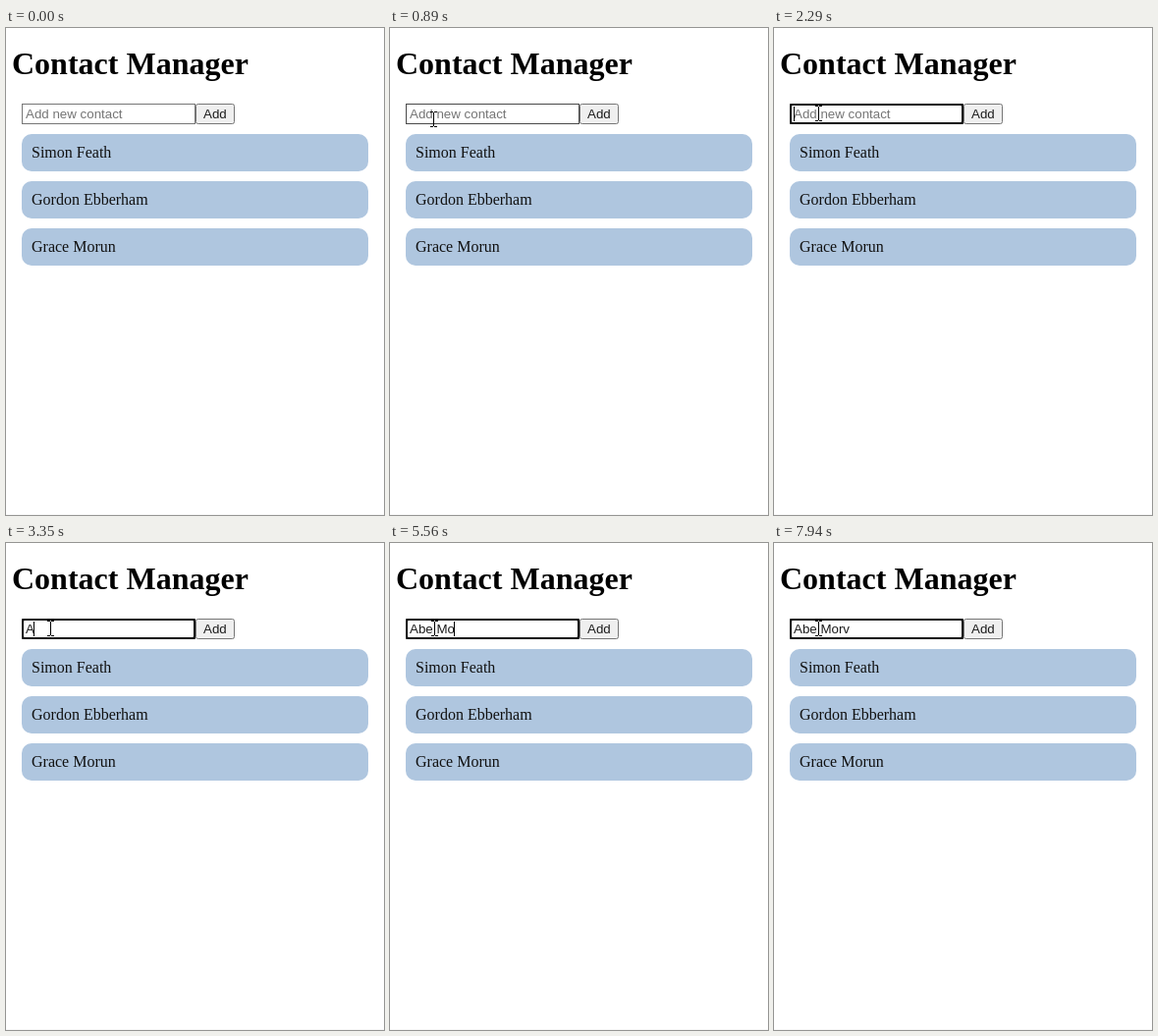
Recreate the animation shown at these times as an HTML page. Size 385 by 496 pixels, loop 8000 ms.

```html
<!DOCTYPE html>
<html lang="en">
<head>
<meta charset="utf-8">
<title>Contact Manager</title>
<style>
html, body { margin: 0; width: 100%; height: 100%; overflow: hidden; background: #fff; }
svg { display: block; width: 385px; height: 496px; }
text { white-space: pre; }
.serif { font: 16px "Liberation Serif", "Times New Roman", serif; fill: #111; }
.title { font-size: 32px; font-weight: bold; fill: #000; }
.sans { font: 13.3333px "Liberation Sans", Arial, sans-serif; fill: #1c1c1c; }
.sans.hint { fill: #757575; }
</style>
</head>
<body>
<svg viewBox="0 0 385 496" xmlns="http://www.w3.org/2000/svg">
  <rect width="385" height="496" fill="#fff"/>
  <rect y="495" width="385" height="1" fill="#f8f8f8"/>
  <text class="serif title" x="6" y="47">Contact Manager</text>
  <rect id="field" x="16.5" y="77.5" width="176" height="20" fill="#fff"/>
  <rect x="193.5" y="77.5" width="39" height="20" rx="2" fill="#efefef" stroke="#767676"/>
  <text class="sans" x="201" y="92">Add</text>
  <rect id="ring" x="17" y="78" width="175" height="19" rx="2" fill="#fff" stroke="#101010" stroke-width="2"/>
  <text id="entry" x="20" y="92"></text>
  <rect id="caret" y="80" width="1" height="15"/>
  <g id="list"></g>
  <path id="arrow" d="M.5 .5V16.5L4.2 13L6.7 18.6L9.2 17.5L6.8 12H11.8Z" fill="#fff" stroke="#000"/>
  <path id="beam" d="M-3 -8H0V-7H1V-8H4V-7H1V7H4V8H1V7H0V8H-3V7H0V-7H-3Z"/>
</svg>
<script>
const LOOP = 8000, ENTER = 150, HOVER = 890, FOCUS = 1230, BLINK = 530, LEFT = 20;
const contacts = ["Simon Feath", "Gordon Ebberham", "Grace Morun"];
const typed = "Abe Morv";
const keys = [3350, 3980, 4080, 4280, 5010, 5560, 6220, 6350];

// Pointer waypoints: time, x, y
const path = [
  [ENTER, 285, 449], [330, 47, 149], [430, 40, 98], [620, 47, 208],
  [780, 47, 208], [HOVER, 44, 93], [1030, 45, 82], [FOCUS, 45, 87]
];

const $ = id => document.getElementById(id);
const set = (el, attrs) => {
  for (const k in attrs) el.setAttribute(k, attrs[k]);
  return el;
};
const show = (el, on) => { el.style.display = on ? "" : "none"; };
const add = (tag, attrs) =>
  $("list").appendChild(set(document.createElementNS("http://www.w3.org/2000/svg", tag), attrs));

contacts.forEach((name, i) => {
  const y = 108 + 48 * i;
  add("rect", { x: 16, y, width: 353, height: 38, rx: 10, fill: "#afc6df" });
  add("text", { class: "serif", x: 26, y: y + 24 }).textContent = name;
});

const pen = document.createElement("canvas").getContext("2d");
pen.font = '13.3333px "Liberation Sans", Arial, sans-serif';

function pointer(t) {
  const i = path.findIndex(p => p[0] > t);
  if (i < 0) return path[path.length - 1].slice(1);
  if (i === 0) return path[0].slice(1);
  const a = path[i - 1], b = path[i], u = (t - a[0]) / (b[0] - a[0]);
  return [1, 2].map(k => Math.round(a[k] + (b[k] - a[k]) * u));
}

function draw(t) {
  const focused = t >= FOCUS, hover = t >= HOVER;
  set($("field"), { stroke: hover ? "#4a4a4a" : "#767676" });
  show($("ring"), focused);

  const pressed = keys.filter(k => t >= k);
  const text = typed.slice(0, pressed.length);
  $("entry").textContent = text || "Add new contact";
  set($("entry"), { class: text ? "sans" : "sans hint" });

  // Each key press restarts the caret's blink
  const since = t - (pressed.pop() || FOCUS);
  show($("caret"), focused && Math.floor(since / BLINK) % 2 === 0);
  set($("caret"), { x: Math.floor(LEFT + pen.measureText(text).width) });

  show($("arrow"), t >= ENTER && !hover);
  show($("beam"), hover);
  set($(hover ? "beam" : "arrow"), { transform: `translate(${pointer(t).join(" ")})` });
}

const start = performance.now();
function tick() {
  draw((performance.now() - start) % LOOP);
  requestAnimationFrame(tick);
}
tick();
</script>
</body>
</html>
```
